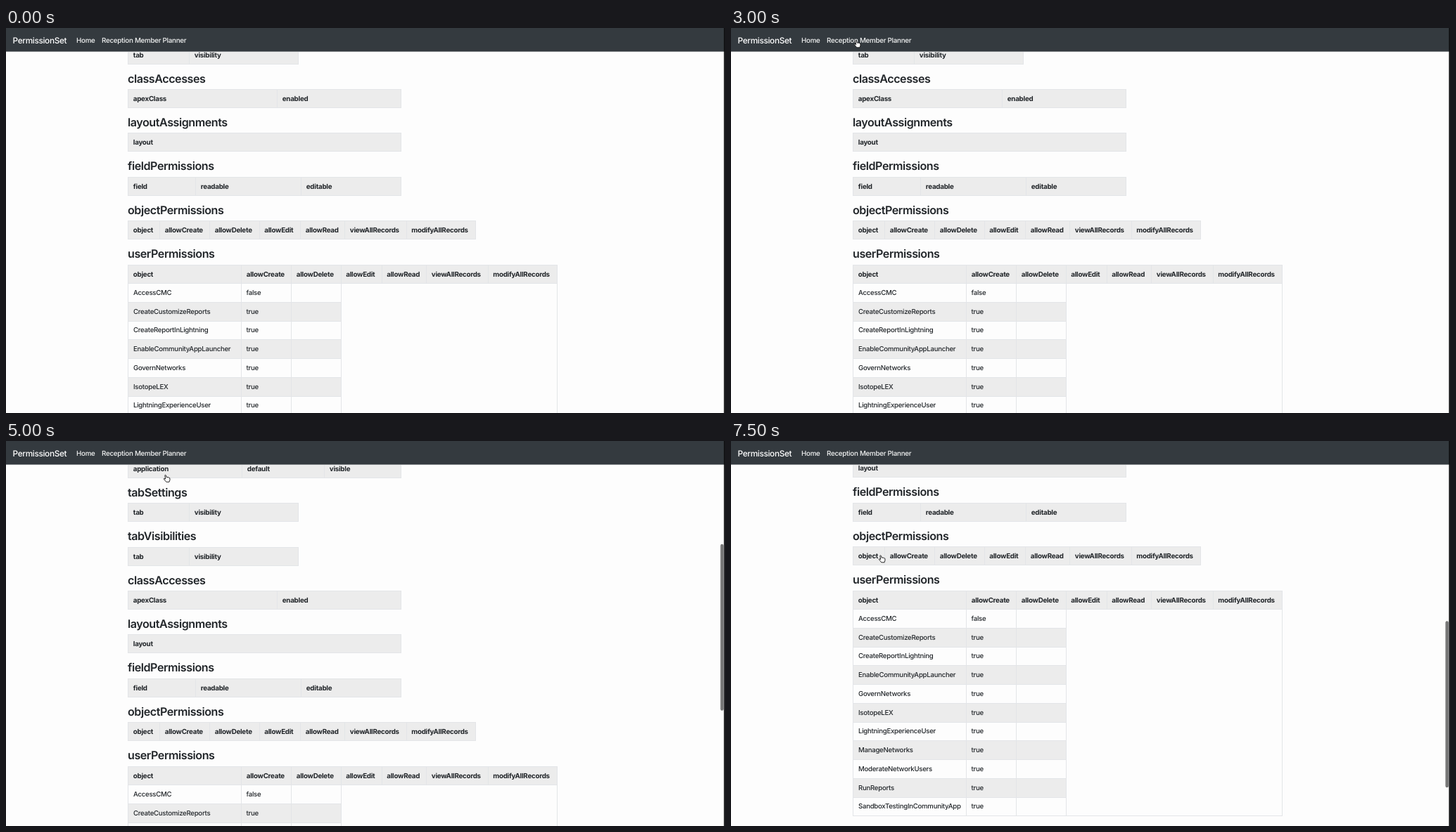
Recreate the animation shown at these times as an HTML page with a canvas. Size 1022 by 548 pixels, loop 8 s.

```html
<!DOCTYPE html>
<html lang="en">
<head>
<meta charset="utf-8">
<title>PermissionSet</title>
<style>
  html, body { margin: 0; width: 100%; height: 100%; overflow: hidden; background: #fdfdfd; }
  canvas { display: block; }
</style>
</head>
<body>
<canvas id="stage" width="1022" height="548"></canvas>
<script>
const W = 1022, H = 548, LOOP = 8000, NAV = 33.6, LEFT = 173;
const FONT = 'Inter, "Open Sans", sans-serif', TRACKING = -0.028;
const PAGE = '#fdfdfd', CELL = '#ececec', LINE = '#e3e5e8', INK = '#212529', LINK = '#1280f5';
const HEAD_H = 26.5, ROW_H = 26.75, SECTION_H = 62.4, LINK_H = 29.8;

const ctx = document.getElementById('stage').getContext('2d');
ctx.textRendering = 'geometricPrecision';

const access = ['object', 'allowCreate', 'allowDelete', 'allowEdit', 'allowRead',
  'viewAllRecords', 'modifyAllRecords'];

// Each section: title, header labels, column edges
const sections = [
  ['applicationVisibilities', ['application', 'default', 'visible'], [173, 335, 452, 562]],
  ['tabSettings', ['tab', 'visibility'], [173, 260, 416]],
  ['tabVisibilities', ['tab', 'visibility'], [173, 260, 416]],
  ['classAccesses', ['apexClass', 'enabled'], [173, 385, 562]],
  ['layoutAssignments', ['layout'], [173, 562]],
  ['fieldPermissions', ['field', 'readable', 'editable'], [173, 269, 419, 562]],
  ['objectPermissions', access, [173, 218, 289, 359.5, 418, 481, 568.5, 668]],
  ['userPermissions', access, [173, 334, 405, 475.5, 533.5, 597, 684.5, 784]]
];

const links = [...sections.map(s => s[0]), 'recordTypeVisibilities', 'customMetadataTypeAccesses'];

const users = ['AccessCMC', 'CreateCustomizeReports', 'CreateReportInLightning',
  'EnableCommunityAppLauncher', 'GovernNetworks', 'IsotopeLEX', 'LightningExperienceUser',
  'ManageNetworks', 'ModerateNetworkUsers', 'RunReports', 'SandboxTestingInCommunityApp'];

// Page jumps: start time, scroll offset, time the scrollbar hides
const jumps = [
  [0, 458, 0],
  [3500, 0, 4500],
  [5000, 332, 6000],
  [6000, 0, 7500],
  [7500, 582, LOOP]
];

// Pointer stops: start time, x, y, shape
const stops = [
  [0, 0, 0, null],
  [1000, 323, 106, arrow],
  [1500, 141, 76, arrow],
  [3000, 178, 18, hand],
  [4500, 227, 48.5, hand],
  [5500, 200, 22, hand],
  [7000, 213, 163, hand]
];

const at = (list, t) => list.filter(item => item[0] <= t).pop();

function text(str, x, mid, size, color = INK, weight = 450) {
  ctx.font = `${weight} ${size}px ${FONT}`;
  ctx.letterSpacing = size * TRACKING + 'px';
  ctx.fillStyle = color;
  ctx.fillText(str, x, mid + size * 0.36);
}

function rect(x, y, w, h, color) {
  ctx.fillStyle = color;
  ctx.fillRect(Math.round(x), Math.round(y), Math.round(w), Math.round(h));
}

function hLine(x1, x2, y) { rect(x1, y, x2 - x1, 1, LINE); }
function vLine(x, y1, y2) { rect(x, y1, 1, y2 - y1, LINE); }

function drawLinks(scroll) {
  links.forEach((name, i) => {
    const y = 49 + i * LINK_H - scroll;
    text(name, 185, y, 9.55, LINK);
    hLine(LEFT, 416, y + 14.4);
  });
}

function drawHeader(labels, edges, y) {
  const right = edges[edges.length - 1];
  rect(LEFT, y, right - LEFT, HEAD_H, CELL);
  hLine(LEFT, right, y);
  hLine(LEFT, right, y + HEAD_H - 0.5);
  edges.slice(0, -1).forEach(x => vLine(x, y, y + HEAD_H));
  vLine(right - 1, y, y + HEAD_H);
  labels.forEach((label, i) => text(label, edges[i] + 7.8, y + 13.4, 9.8, INK, 700));
}

function drawUsers(edges, top) {
  const bottom = top + users.length * ROW_H;
  users.forEach((name, i) => {
    const y = top + i * ROW_H, mid = y + 13.4;
    if (i % 2) rect(LEFT, y, edges[3] - LEFT, ROW_H, CELL);
    hLine(LEFT, edges[3], y);
    text(name, 181, mid, 9.65);
    text(i ? 'true' : 'false', 341.5, mid, 9.65);
  });
  edges.slice(0, 4).forEach(x => vLine(x, top, bottom));
  vLine(edges[7] - 1, top, bottom);
  hLine(LEFT, edges[7], bottom);
}

function drawSections(scroll) {
  sections.forEach(([title, labels, edges], i) => {
    const y = i * SECTION_H - scroll;
    text(title, LEFT, 342.6 + y, 16.1, INK, 600);
    drawHeader(labels, edges, 357.8 + y);
    if (title === 'userPermissions') drawUsers(edges, 357.8 + y + HEAD_H);
  });
}

function drawNav() {
  ctx.fillStyle = '#343a3f';
  ctx.fillRect(0, 0, W, NAV);
  text('PermissionSet', 9.5, 17.3, 11.8, '#fff');
  text('Home', 100, 17.3, 9.8, '#f4f5f5');
  text('Reception Member Planner', 136, 17.3, 9.8, '#f4f5f5');
}

function drawScrollbar(scroll) {
  ctx.fillStyle = 'rgba(0,0,0,.53)';
  ctx.beginPath();
  ctx.roundRect(1015.5, 1.5 + scroll * 0.4375, 4.5, 237, 2.25);
  ctx.fill();
}

function drawEdge() {
  ctx.fillStyle = '#0c0d0e';
  ctx.fillRect(W - 1.5, 0, 1.5, H);
}

function shape(points) {
  ctx.beginPath();
  points.forEach(([x, y]) => ctx.lineTo(x, y));
  ctx.closePath();
}

function arrow() {
  shape([[0, 0], [0, 7.6], [1.8, 6], [2.9, 8.6], [4.2, 8], [3.1, 5.5], [5.4, 5.4]]);
  ctx.strokeStyle = '#fff';
  ctx.lineWidth = 1.4;
  ctx.stroke();
  ctx.fillStyle = '#000';
  ctx.fill();
}

function hand() {
  shape([[-1.2, 0.3], [-0.4, -0.2], [0.4, 0.4], [1.2, 3.2], [3, 3], [4.6, 3.6], [5.8, 4.2],
    [6, 6.8], [5, 9.8], [0.8, 9.8], [-1, 7.6], [-2.8, 5.4], [-2, 4.7], [-0.3, 5.6]]);
  ctx.fillStyle = '#fff';
  ctx.fill();
  ctx.strokeStyle = '#111';
  ctx.lineWidth = 0.9;
  ctx.stroke();
}

function drawPointer(t) {
  const [, x, y, draw] = at(stops, t);
  if (!draw) return;
  ctx.save();
  ctx.translate(x, y);
  ctx.lineJoin = 'round';
  draw();
  ctx.restore();
}

function render(t) {
  const [, scroll, hideAt] = at(jumps, t);
  rect(0, 0, W, H, PAGE);
  drawLinks(scroll);
  drawSections(scroll);
  // Keep page content from showing through the soft lower edge of the bar
  rect(0, 0, W, NAV, PAGE);
  drawNav();
  if (t < hideAt) drawScrollbar(scroll);
  drawEdge();
  drawPointer(t);
}

const start = performance.now();
function tick() {
  render((performance.now() - start) % LOOP);
  requestAnimationFrame(tick);
}
tick();
</script>
</body>
</html>
```
